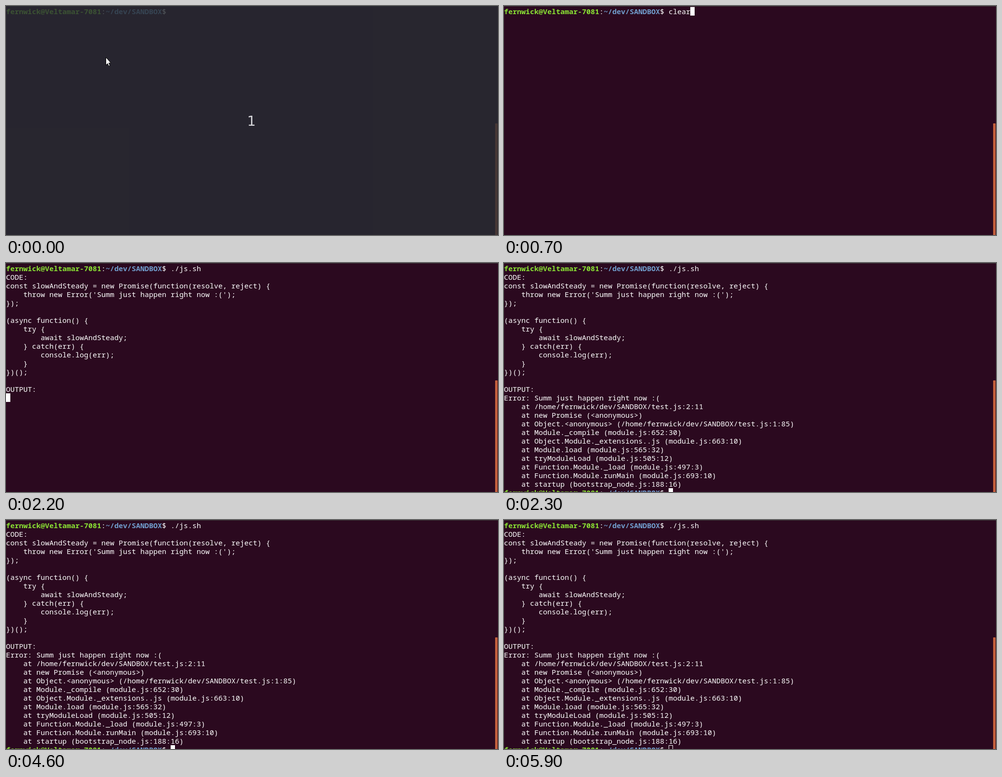
Recreate the animation shown at these times as an HTML page. Size 1022x478 px, loop 6 s.

```html
<!DOCTYPE html>
<html lang="en">
<head>
<meta charset="utf-8">
<title>Terminal session</title>
<style>
  html, body { margin: 0; width: 100%; height: 100%; overflow: hidden; background: #2b091f; }
  .stage { position: relative; width: 1022px; height: 478px; overflow: hidden; background: #2b091f; }
  .stage > * { position: absolute; }

  pre {
    left: 0; margin: 0; color: #fff;
    font: 15px/18px "Noto Sans Mono", "DejaVu Sans Mono", monospace;
    font-variant-ligatures: none;
  }
  .host { color: #8ae234; }
  .path { color: #729fcf; }
  .first { top: 2px; }
  .typed { top: 2px; left: 342px; }
  .code { top: 20px; }
  .output { top: 272px; }

  .edge { left: 0; top: 0; width: 100%; height: 1px; background: #3b3838; }
  .scrollbar { left: 1016px; top: 245px; width: 5px; height: 233px; border-radius: 1px 1px 0 0; background: #c4603c; }
  .cursor { left: 0; top: 0; width: 9px; height: 18px; background: #fff; box-shadow: inset 0 0 0 1px #fff; }
  .ibeam { left: 0; top: 0; }
  .countdown { inset: 0; background: rgba(39, 45, 52, .8); }
  .countdown text { font: 28px "DejaVu Sans", sans-serif; fill: #d6d6da; text-anchor: middle; }

  /* Every change is a hard cut; 1% is 60 ms. */
  .clear, .script, .code, .output, .cursor, .ibeam, .countdown {
    animation: 6s step-end infinite;
  }
  .clear { animation-name: clear; }
  .script { animation-name: script; }
  .code { animation-name: code; }
  .output { animation-name: output; }
  .cursor { animation-name: cursor; }
  .ibeam { animation-name: ibeam; }
  .countdown { animation-name: countdown; }

  @keyframes countdown { 0% { opacity: 1 } 1.666%, 100% { opacity: 0 } }
  @keyframes clear { 0% { opacity: 0 } 11.666% { opacity: 1 } 15%, 100% { opacity: 0 } }
  @keyframes script { 0% { opacity: 0 } 15%, 100% { opacity: 1 } }
  @keyframes code { 0% { opacity: 0 } 36.666%, 100% { opacity: 1 } }
  @keyframes output { 0% { opacity: 0 } 38.333%, 100% { opacity: 1 } }

  @keyframes cursor {
    0% { opacity: 0; transform: translate(342px, 2px); background: #fff }
    6.666% { opacity: 1 }
    11.666% { transform: translate(387px, 2px) }
    15% { transform: translate(405px, 2px) }
    25% { opacity: 0 }
    35% { opacity: 1 }
    36.666% { transform: translate(0, 272px) }
    38.333% { transform: translate(342px, 470px) }
    46.666% { opacity: 0 }
    56.666% { opacity: 1 }
    66.666% { opacity: 0 }
    76.666% { opacity: 1 }
    86.666% { opacity: 0 }
    96.666% { opacity: 1 }
    98.333%, 100% { opacity: 1; transform: translate(342px, 470px); background: transparent }
  }

  @keyframes ibeam {
    0% { opacity: 0; transform: translate(206px, 101px) }
    1.666% { opacity: 1 }
    10% { opacity: 0 }
    81.666% { opacity: 1; transform: translate(4px, 8px) }
    83.333% { transform: translate(92px, 40px) }
    85% { transform: translate(204px, 76px) }
    86.666% { transform: translate(300px, 104px) }
    88.333% { transform: translate(341px, 116px) }
    96.666% { transform: translate(1006px, 232px) }
    98.333%, 100% { opacity: 0; transform: translate(1006px, 232px) }
  }
</style>
</head>
<body>
<div class="stage">
  <div class="edge"></div>
  <pre class="first"><b class="host">fernwick@Veltamar-7081</b>:<b class="path">~/dev/SANDBOX</b>$</pre>
  <pre class="typed clear">clear</pre>
  <pre class="typed script">./js.sh</pre>
  <pre class="code">CODE:
const slowAndSteady = new Promise(function(resolve, reject) {
    throw new Error('Summ just happen right now :(');
});

(async function() {
    try {
        await slowAndSteady;
    } catch(err) {
        console.log(err);
    }
})();

OUTPUT:</pre>
  <pre class="output">Error: Summ just happen right now :(
    at /home/fernwick/dev/SANDBOX/test.js:2:11
    at new Promise (&lt;anonymous&gt;)
    at Object.&lt;anonymous&gt; (/home/fernwick/dev/SANDBOX/test.js:1:85)
    at Module._compile (module.js:652:30)
    at Object.Module._extensions..js (module.js:663:10)
    at Module.load (module.js:565:32)
    at tryModuleLoad (module.js:505:12)
    at Function.Module._load (module.js:497:3)
    at Function.Module.runMain (module.js:693:10)
    at startup (bootstrap_node.js:188:16)
<b class="host">fernwick@Veltamar-7081</b>:<b class="path">~/dev/SANDBOX</b>$</pre>
  <div class="cursor"></div>
  <div class="scrollbar"></div>
  <svg class="ibeam" width="7" height="17" fill="none">
    <path d="M1 1.5H6M3.5 1.5V15.5M1 15.5H6" stroke="#000" stroke-width="3"/>
    <path d="M1 1.5H6M3.5 1.5V15.5M1 15.5H6" stroke="#fff"/>
  </svg>
  <svg class="countdown" width="1022" height="478">
    <text x="510" y="250">1</text>
    <path d="M207.5 107V123.5L211 120.2L213.6 125.5L216 124.4L213.5 119H218Z" fill="#fff" stroke="#000"/>
  </svg>
</div>
</body>
</html>
```
